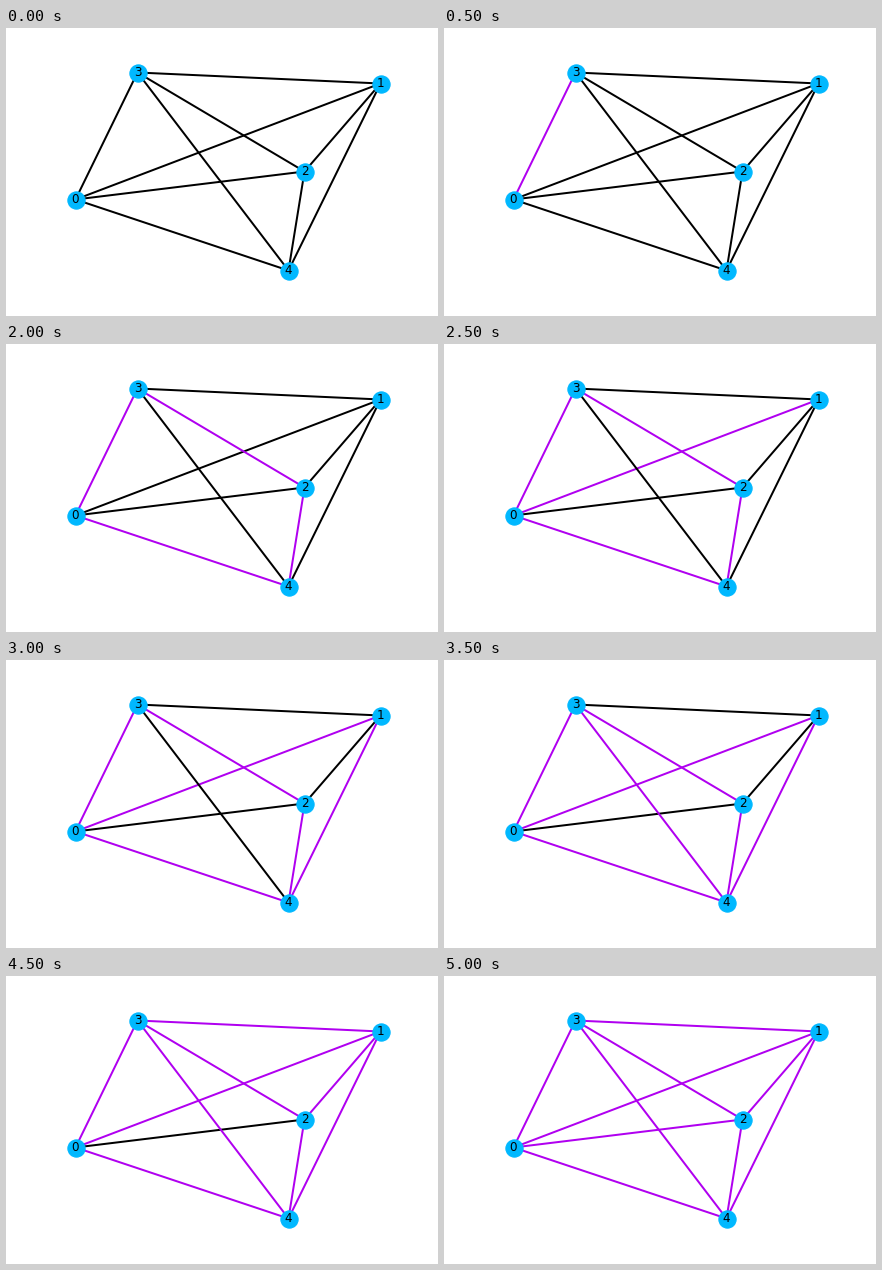
Write a matplotlib script that moves like this. It is 432 px wide and 288 px high and loops after 5500 ms.

```python
from itertools import combinations

import matplotlib.pyplot as plt
from matplotlib.animation import FuncAnimation
from matplotlib.collections import LineCollection

W, H, DPI = 432, 288, 72
STEP_MS = 500
NODE, PLAIN, VISITED = "#00b8ff", "#000000", "#b000f0"

nodes = [(69.5, 171.5), (374.5, 55.5), (298.5, 143.5), (131.5, 44.5), (282.5, 242.5)]
edges = list(combinations(range(len(nodes)), 2))

# Eulerian circuit through the complete graph
tour = [0, 3, 2, 4, 0, 1, 4, 3, 1, 2, 0]
walk = [tuple(sorted(pair)) for pair in zip(tour, tour[1:])]

fig = plt.figure(figsize=(W / DPI, H / DPI), dpi=DPI, facecolor="white")
ax = fig.add_axes([0, 0, 1, 1])
ax.set_xlim(0, W)
ax.set_ylim(H, 0)
ax.axis("off")

lines = LineCollection([[nodes[a], nodes[b]] for a, b in edges],
                       colors=PLAIN, linewidths=2, zorder=1)
ax.add_collection(lines)
ax.scatter(*zip(*nodes), s=300, c=NODE, linewidths=1.0, zorder=2)
for i, (x, y) in enumerate(nodes):
    ax.text(x, y, str(i), size=12, family="DejaVu Sans", color="black",
            ha="center", va="center", zorder=3)


def draw(step):
    seen = set(walk[:step])
    lines.set_color([VISITED if e in seen else PLAIN for e in edges])
    return [lines]


anim = FuncAnimation(fig, draw, frames=len(walk) + 1, interval=STEP_MS,
                     repeat=True, repeat_delay=0)
plt.show()
```
